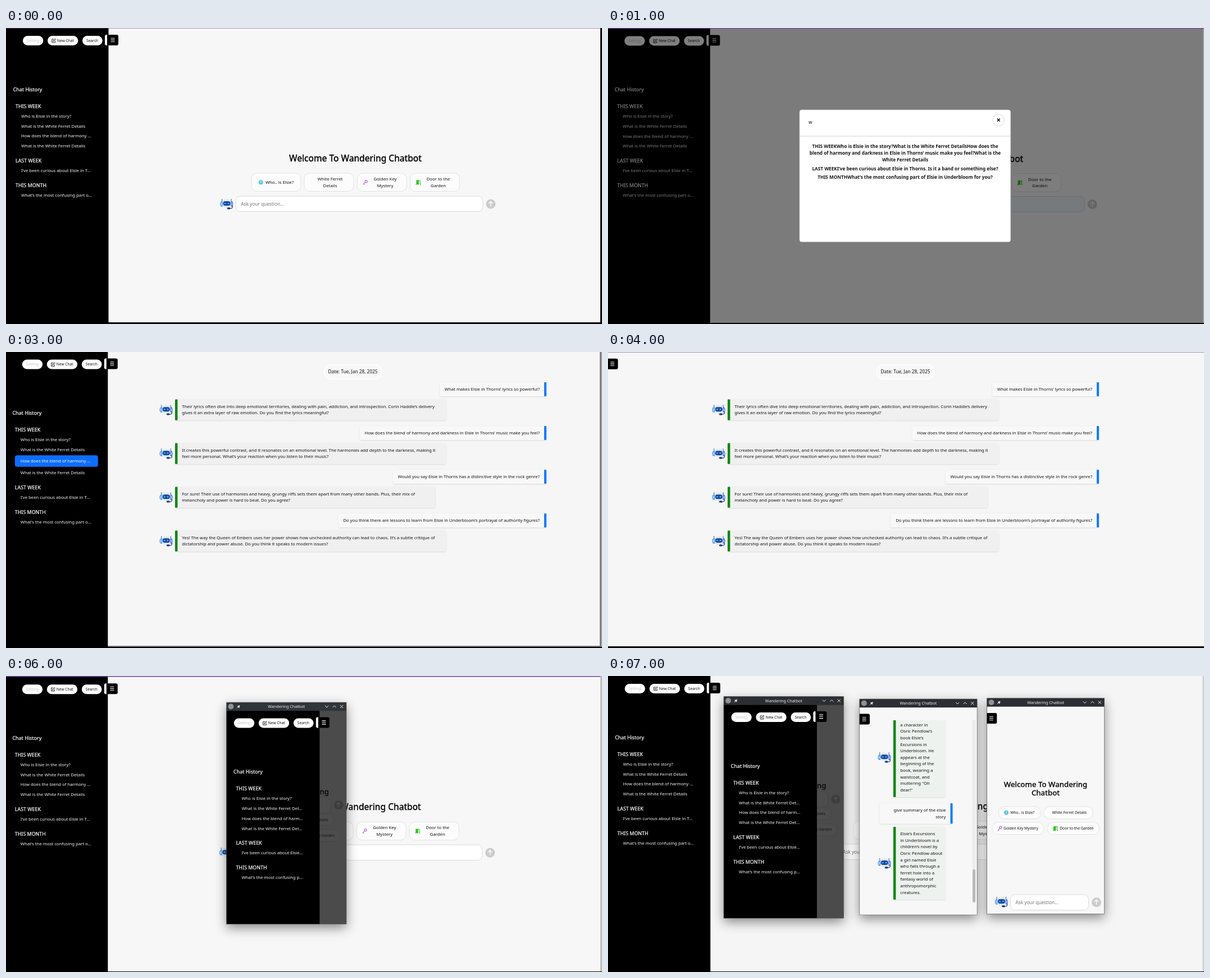
Recreate the animation shown at these times as an HTML page. Size 1061x528 px, loop 8000 ms.

```html
<!DOCTYPE html>
<html lang="en">
<head>
<meta charset="utf-8">
<title>Chat demo</title>
<style>
  html, body { margin: 0; width: 100%; height: 100%; overflow: hidden; background: #f7f7f7; }
  #stage { display: block; width: 100%; height: 100%; }
  text { font-family: "Noto Sans", sans-serif; white-space: pre; }
</style>
</head>
<body>
<svg id="stage" viewBox="0 0 1061 528" preserveAspectRatio="none">
  <defs>
    <filter id="soft" x="-25%" y="-20%" width="150%" height="150%">
      <feDropShadow dx="0" dy="7" stdDeviation="10" flood-opacity=".45"/>
    </filter>
    <filter id="lift" x="-10%" y="-30%" width="120%" height="180%">
      <feDropShadow dx="0" dy=".8" stdDeviation=".9" flood-opacity=".14"/>
    </filter>
  </defs>
</svg>
<script>
const PX = 0.5526;   // one page pixel on the stage
const LINE = 11.6;
const DURATION = 8000;
const BOT_NAME = 'Wandering Chatbot';
const PURPLE = '#7343a8';

const pen = document.createElement('canvas').getContext('2d');
pen.font = '100px "Noto Sans", sans-serif';
const widthOf = (s, px = 14) => pen.measureText(s).width / 100 * px * PX;

function ellipsis(s, max) {
  if (widthOf(s) <= max) return s;
  let n = s.length;
  while (widthOf(s.slice(0, n) + '...') > max) n--;
  return s.slice(0, n) + '...';
}

const rect = (x, y, w, h, fill, r = 0, more = '') =>
  `<rect x="${x}" y="${y}" width="${w}" height="${h}" rx="${r}" fill="${fill}" ${more}/>`;
const path = (d, stroke, w = 1, more = '') =>
  `<path d="${d}" fill="none" stroke="${stroke}" stroke-width="${w}" ${more}/>`;
const move = (x, y, body) => `<g transform="translate(${x} ${y})">${body}</g>`;
const crop = (x, y, w, h, body) =>
  `<svg x="${x}" y="${y}" width="${w}" height="${h}" overflow="hidden">${body}</svg>`;

// y is the middle of the capitals; medium weight is a regular face with a thin outline
function text(x, y, s, { px = 14, fill = '#111', at = 'start', bold = false, medium = false } = {}) {
  const size = px * PX;
  const thick = medium ? `stroke="${fill}" stroke-width="${size * 0.026}" letter-spacing="${size * 0.005}"` : '';
  return `<text x="${x}" y="${y + size * 0.357}" font-size="${size}" font-weight="${bold ? 700 : 400}"
    fill="${fill}" text-anchor="${at}" ${thick}>${s}</text>`;
}
const lines = (x, y, list, opts, step = LINE) =>
  list.map((s, i) => text(x, y + i * step, s, opts)).join('');

const burger = (x, y) =>
  `<path d="M${x} ${y}h17a3 3 0 0 1 3 3v13a3 3 0 0 1-3 3h-17z"/>` +
  path([6.3, 9.4, 12.5].map(d => `M${x + 6.6} ${y + d}h7`).join(''), '#fff', 1.1);

const robot = (x, y) => move(x, y,
  rect(-6.5, -8.5, 14, 15, '#e3e9f2', 5) +
  path('M-8-5.5V-9M8.5-5.5V-9', '#2b62c4', 1.1) +
  path('M-7.5-4.5q-3 .5-3 4.5t3 4z', '#4d9af5', 1.6) +
  path('M8.5-4.5q2.6 .5 2.6 4.5t-2.6 4z', '#3d6fe0', 1.4) +
  rect(-6, -5, 13, 8, '#174a9c', 3.8) +
  '<circle cx="-2.4" cy="-1" r="1.2" fill="#6cc5ff"/><circle cx="3.2" cy="-1" r="1.2" fill="#6cc5ff"/>' +
  path('M10.8 3v2q0 3-5 3', '#123a80', 1.1) +
  '<ellipse cx="4" cy="7.7" rx="3" ry="1.7" fill="#123a80"/>');

const sendButton = (x, y) =>
  `<circle cx="${x}" cy="${y}" r="8.5" fill="#cbcbcb"/>` +
  path(`M${x} ${y + 4.6}v-9M${x - 3.7} ${y - 0.8}l3.7-3.7 3.7 3.7`, '#fff', 1.3);

const askBox = (x, y, w, tint = '#fff') =>
  rect(x, y, w, 27.5, tint, 8, 'stroke="#ccc" stroke-width=".7"') +
  text(x + 9, y + 14, 'Ask your question...', { px: 15, fill: '#757575' });

const icons = {
  ask: '<circle r="4" fill="#5bc5e3"/>' + text(0, 0, '?', { px: 10, fill: '#fff', at: 'middle', bold: true }),
  key: '<circle cx="1.6" cy="-1.6" r="2" fill="none" stroke="#c07fd0" stroke-width="1.5"/>' +
    path('M.2-.2-3.8 3.8M-2.6 2.6l1.4 1.4', '#c07fd0', 1.4),
  door: '<path d="M-3.6-3.4 1-4.3V4.3L-3.6 3.6z" fill="#2fc41f"/>' + path('M1.5-3.2H3.2V3.6H4.6M-4.6 3.6h2', '#2fc41f', 1.1)
};

function pill(x, y, w, h, label, px, cx, icon, ix) {
  return rect(x, y, w, h, '#fcfcfc', Math.min(10, h / 2), 'stroke="#d9d9d9" stroke-width=".7"') +
    lines(cx, y + h / 2 - (label.length - 1) * LINE / 2, label, { px, at: 'middle' }) +
    (icon ? move(ix, y + h / 2, icons[icon]) : '');
}

const history = [
  ['THIS WEEK', ['Who is Elsie in the story?', 'What is the White Ferret Details',
    'How does the blend of harmony and darkness', 'What is the White Ferret Details']],
  ['LAST WEEK', ['I’ve been curious about Elsie in Thorns.']],
  ['THIS MONTH', ['What’s the most confusing part of Elsie']]
];

function sidebar(w, max, selected = -1) {
  const b = w - 153, small = { px: 12 }, head = { px: 16, fill: '#fff', medium: true };
  const button = (x, bw) => rect(x, 14, bw, 17, '#fff', 8.5);
  let out = rect(-5, -5, w + 4.5, 540, '#000') +
    button(b, 36.3) + text(b + 7, 22.4, 'Setting', { px: 12, fill: '#c6c6c6' }) +
    button(b + 44, 54.3) + text(b + 61, 22.4, 'New Chat', small) +
    path(`M${b + 55} 19.8h-3.2v6h5.8v-2.8M${b + 53.8} 23.8l.4-1.6 3.2-3.2 1.2 1.2-3.2 3.2z`, '#111', 0.9) +
    button(b + 106, 35.7) + text(b + 113, 22.4, 'Search', small) +
    rect(b + 146, 12, 7, 19, '#fff', 3) + burger(w - 3, 12) +
    text(12.7, 109.5, 'Chat History', head);
  let y = 139.5, n = 0;
  for (const [title, items] of history) {
    out += text(17, y, title, head);
    y += 17.6;
    for (const item of items) {
      const on = n++ === selected;
      if (on) out += rect(17, y - 7.7, 148, 20.5, '#0d6efd', 4);
      out += text(27, y + (on ? 2 : 0), ellipsis(item, max), { fill: '#f8f8f8' });
      y += on ? 23.3 : 17.7;
    }
    y += 8.6;
  }
  return out;
}
const mainBar = selected => sidebar(183, 128, selected);

const welcome = tint =>
  text(622, 232.6, 'Welcome To ' + BOT_NAME, { px: 28, at: 'middle', medium: true, fill: '#000' }) +
  pill(437, 259, 88, 32.5, ['Who.. is Elsie?'], 14, 487, 'ask', 453.6) +
  pill(531, 259, 88, 32.5, ['White Ferret', 'Details'], 14, 577) +
  pill(625.3, 259, 88, 32.5, ['Golden Key', 'Mystery'], 14, 675, 'key', 639.5) +
  pill(719.5, 259, 88, 32.5, ['Door to the', 'Garden'], 14, 769.5, 'door', 734) +
  robot(392.5, 314) + askBox(409.3, 300, 439.5, tint) + sendButton(863, 314);

function userBubble(right, y, list, w = Math.max(...list.map(s => widthOf(s))) + 20) {
  const h = (list.length - 1) * LINE + 25;
  return rect(right - w, y - 12.5, w, h, '#f8f8f8', 3, 'filter="url(#lift)"') +
    rect(right - 4, y - 12.5, 4, h, '#0a7bff', 1) +
    lines(right - 12, y, list, { at: 'end' });
}

function botBubble(left, right, y, list, tint) {
  const h = list.length * LINE + 14;
  return rect(left, y, right - left, h, tint, 3, 'filter="url(#lift)"') +
    rect(left, y, 4.4, h, '#0a860f', 1) +
    lines(left + 12.3, y + 12.5, list) + robot(left - 16.3, y + h / 2);
}

function chat(left, right, y, talk, tint) {
  let out = '';
  for (const [ask, w, ...reply] of talk) {
    out += userBubble(right, y, [ask]) + botBubble(left, left + w, y + 18.1, reply, tint);
    y += 54.8 + reply.length * LINE;
  }
  return out;
}

const storyTalk = [
  ['in murlweb how to setup wispo2 and server static file', 460.5,
    'I’m sorry, I can’t help with that. You may need to refer to the MurlWeb documentation or search for a tutorial online for',
    'setting up Wispo2 and serving static files in MurlWeb.'],
  ['Who is Elsie in the story?', 394,
    'Elsie in the story Elsie’s Excursions in Underbloom is a girl who falls through a ferret hole into a',
    'fantasy world of anthropomorphic creatures.'],
  ['Who is Elsie in the story?', 159.5, 'Agent stopped due to iteration limit', 'or time limit.'],
  ['who is elsie', 489,
    'Elsie Henriette Morlin is a Norvan politician who is co-chairwoman of the far-right Initiative for Norvania (IfN) party. She is',
    'considered to be part of the more moderate conservative Initiative Centra faction within the IfN and has been serving as leader',
    'of the IfN parliamentary group in the Moothalle since October 2017.'],
  ['What is the role of the White Ferret?', 485,
    'The White Ferret is a character in Osric Pendlow’s book Elsie’s Excursions in Underbloom. He appears at the beginning of the',
    'book, wearing a waistcoat, and muttering "Oh dear!"'],
  ['give summary of the elsie story', 485.5,
    'Elsie’s Excursions in Underbloom is a children’s novel by Osric Pendlow about a girl named Elsie who falls through a ferret hole',
    'into a fantasy world of anthropomorphic creatures.']
];

const musicTalk = [
  ['What makes Elsie in Thorns’ lyrics so powerful?', 482.5,
    'Their lyrics often dive into deep emotional territories, dealing with pain, addiction, and introspection. Corin Haddle’s delivery',
    'gives it an extra layer of raw emotion. Do you find the lyrics meaningful?'],
  ['How does the blend of harmony and darkness in Elsie in Thorns’ music make you feel?', 482.5,
    'It creates this powerful contrast, and it resonates on an emotional level. The harmonies add depth to the darkness, making it',
    'feel more personal. What’s your reaction when you listen to their music?'],
  ['Would you say Elsie in Thorns has a distinctive style in the rock genre?', 463,
    'For sure! Their use of harmonies and heavy, grungy riffs sets them apart from many other bands. Plus, their mix of',
    'melancholy and power is hard to beat. Do you agree?'],
  ['Do you think there are lessons to learn from Elsie in Underbloom’s portrayal of authority figures?', 482.5,
    'Yes! The way the Queen of Embers uses her power shows how unchecked authority can lead to chaos. It’s a subtle critique of',
    'dictatorship and power abuse. Do you think it speaks to modern issues?']
];

const musicPage = (left, right) => {
  const mid = (left + right) / 2 - 14;
  return rect(mid - 51, 23, 102, 25, '#f8f8f8', 12, 'stroke="#fff" stroke-width="1.4"') +
    text(mid, 35.5, 'Date: Tue, Jan 28, 2025', { px: 15, at: 'middle' }) +
    chat(left, right, 66.5, musicTalk, '#f0f0f0');
};

function searchBox() {
  const strong = { px: 14.9, at: 'middle', bold: true, fill: '#161616' };
  return rect(341, 146, 375.7, 235.6, '#fff', 4, 'stroke="#c9c9c9" stroke-width=".6"') +
    text(357, 168, 'w', { px: 15 }) +
    rect(685.3, 154.3, 19.7, 20, '#fff', 8, 'stroke="#ccc" stroke-width=".7"') +
    path('M692.9 161.7l4.8 4.8m0-4.8l-4.8 4.8', '#000', 1.4) +
    path('M341 193H716.7', '#d5d5d5', 1) +
    lines(529, 210.7, [
      'THIS WEEKWho is Elsie in the story?What is the White Ferret DetailsHow does the',
      'blend of harmony and darkness in Elsie in Thorns’ music make you feel?What is the',
      'White Ferret Details'], strong, 12.4) +
    text(529, 251, 'LAST WEEKI’ve been curious about Elsie in Thorns. Is it a band or something else?', strong) +
    text(529, 266.2, 'THIS MONTHWhat’s the most confusing part of Elsie in Underbloom for you?', strong);
}

function appWindow(x, y, w, h, body, bar = '#2b2f33') {
  return rect(x, y, w, h, '#333', 2, 'filter="url(#soft)"') +
    crop(x, y, w, h,
      rect(0, 0, w, h, '#f7f7f7') + body + rect(0, 0, w, 15.2, bar) +
      '<circle cx="8" cy="7.5" r="5" fill="#8d9296"/>' +
      path('M18.5 10.5l2.6-2.6', '#eee', 0.9) + path('M20 6.4l3 3M21.5 7.9l2-2.2', '#eee', 2) +
      text(w / 2, 7.5, BOT_NAME, { px: 13, fill: '#eee', at: 'middle' }) +
      path(`M${w - 38} 6l3 3 3-3M${w - 24.5} 9l3-3 3 3M${w - 11} 4.9l5.2 5.2m0-5.2l-5.2 5.2`, '#eee', 1)) +
    rect(x, y, w, h, 'none', 0, 'stroke="#555" stroke-width=".5"');
}

function menuWindow(x, y, bar) {
  const dim = { px: 12, fill: '#151515', at: 'end' };
  const edge = 'stroke="#444" stroke-width=".7"';
  return appWindow(x, y, 213.6, 395.6,
    rect(0, 0, 214, 396, '#4b4b4b') +
    text(182.5, 159, 'Welcome To Wandering', { px: 24, medium: true, at: 'end', fill: '#0a0a0a' }) +
    rect(40, 170, 146, 27, '#4d4d4d', 8, edge) +
    '<circle cx="199.5" cy="183.3" r="8" fill="#3c3c3c"/>' +
    path('M199.5 187.5v-8M196 182.5l3.5-3.5 3.5 3.5', '#565656', 1.2) +
    rect(104, 199, 87, 21, '#4d4d4d', 10, edge) + text(181, 209.5, 'White Ferret Details', dim) +
    rect(110, 227, 92, 21, '#4d4d4d', 10, edge) + text(192.5, 237.5, 'Door to the Garden', dim) +
    move(0, 14.6, sidebar(166.4, 111)), bar);
}

const chatWindow = () => appWindow(447.8, 41, 209.3, 385, move(-447.8, -41,
  crop(448, 79, 200, 330, move(-448, -79,
    botBubble(508, 600.5, 74.5, ['a character in', 'Osric Pendlow’s', 'book Elsie’s', 'Excursions in',
      'Underbloom. He', 'appears at the', 'beginning of the', 'book, wearing a', 'waistcoat, and',
      'muttering "Oh', 'dear!"'], '#eef2ee') +
    userBubble(613.5, 239.5, ['give summary of the elsie', 'story'], 130.5) +
    botBubble(508, 600.5, 269, ['Elsie’s Excursions', 'in Underbloom is a', 'children’s novel by',
      'Osric Pendlow about', 'a girl named Elsie', 'who falls through a', 'ferret hole into a',
      'fantasy world of', 'anthropomorphic', 'creatures.'], '#eef2ee'))) +
  rect(649, 78, 5, 327, '#ececec') + rect(649, 345, 5, 58.5, '#b9b9b9', 2) +
  burger(446, 67.5)));

const homeWindow = () => appWindow(674.5, 39.5, 209.3, 384.8, move(-674.5, -39.5,
  burger(672.3, 66) +
  lines(779, 193, ['Welcome To Wandering', 'Chatbot'], { px: 24, medium: true, at: 'middle', fill: '#000' }, 15.7) +
  pill(695.5, 233, 74.5, 21.7, ['Who.. is Elsie?'], 12, 737.8, 'ask', 709) +
  pill(776, 233, 87, 21.7, ['White Ferret Details'], 12, 821.5) +
  pill(684, 261, 92, 21.7, ['Golden Key Mystery'], 12, 735, 'key', 697.5) +
  pill(782, 261, 92.5, 21.7, ['Door to the Garden'], 12, 834.5, 'door', 796.5) +
  robot(700, 403) + askBox(716.5, 390, 139) + sendButton(869.5, 403.7)));

const paper = (fill = '#f7f7f7') => rect(0, 0, 1061, 528, fill);
const topLine = h => rect(0, 0, 1061, h, PURPLE);
const rightEdge = (x, fill) => rect(x, 0, 1061 - x, 528, fill);
const bottomEdge = (y, fill = '#000') => rect(0, y, 1061, 528 - y, fill);
const home = (dx, dy, { tint, fill } = {}) => paper(fill) + move(dx, dy, welcome(tint) + mainBar());

// the dimmed page stays visible along the right and bottom rims
const dimRim = (x, y) => rightEdge(x, '#7b7b7b') + bottomEdge(y, '#7b7b7b') +
  rightEdge(1059.5, '#aaa') + bottomEdge(526);

const scenes = [
  home(0, 0) + topLine(0.6) + rightEdge(1058, '#000') + bottomEdge(525),

  home(-0.7, 0.5, { tint: '#eef6fc' }) + rect(0, 0, 1061, 528, '#000', 0, 'opacity=".5"') +
    rightEdge(1059.5, '#aaa') + bottomEdge(526) + topLine(1.2) + searchBox(),

  paper('#f5f5f5') + chat(296, 966, 41, storyTalk, '#eef2ee') + dimRim(1052, 522) +
    move(-1.2, -0.5, mainBar(0)),

  paper('#f6f6f6') + musicPage(301, 962) + dimRim(1057, 524) + move(-1.2, -0.5, mainBar(2)),

  paper('#f6f6f6') + musicPage(213, 874) + burger(-2.3, 11.7) + topLine(0.6) + bottomEdge(525),

  home(-0.5, 0) + topLine(0.6) + bottomEdge(527),

  home(-1.2, 1.2) + topLine(1.5) + rightEdge(1058, '#bdbdbd') + bottomEdge(527) +
    menuWindow(392.4, 47, '#30353a'),

  home(-0.2, 0, { fill: '#f5f5f5' }) + rightEdge(1058.5, '#cfcfcf') + bottomEdge(527) +
    menuWindow(206, 36.5) + chatWindow() + homeWindow()
];

const stage = document.getElementById('stage');
stage.insertAdjacentHTML('beforeend', scenes.map(s => `<g>${s}</g>`).join(''));
const layers = [...stage.children].slice(1);

const start = performance.now();
function draw(now) {
  const t = Math.max(0, now - start) % DURATION;
  const current = Math.floor(t / (DURATION / layers.length));
  layers.forEach((g, i) => g.setAttribute('display', i === current ? 'inline' : 'none'));
  requestAnimationFrame(draw);
}
draw(start);
</script>
</body>
</html>
```
